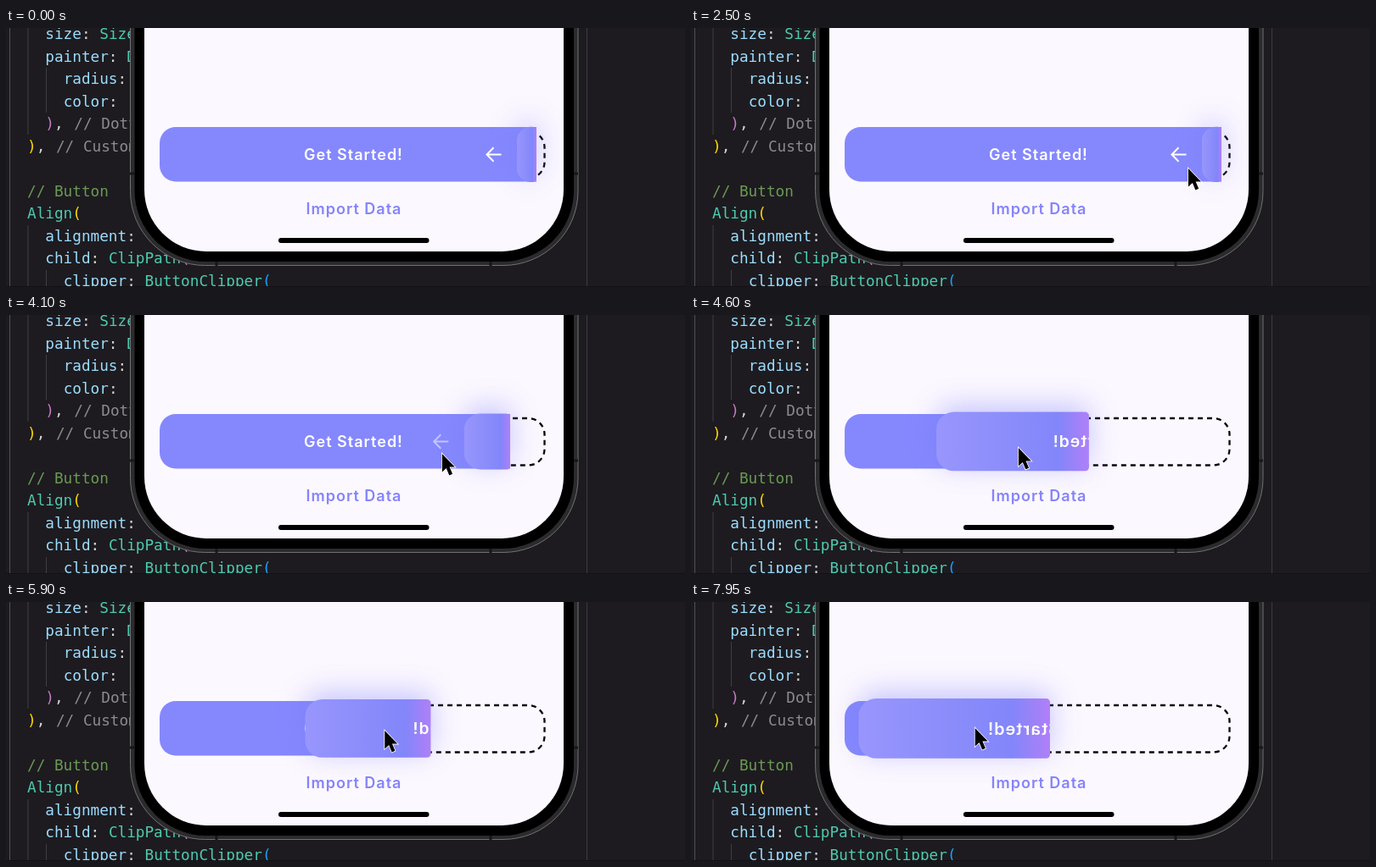
These frames come from a looping animation (800 by 306 pixels, 8 s). An HTML page:

```html
<!DOCTYPE html>
<html lang="en">
<head>
<meta charset="utf-8">
<title>Peel button</title>
<style>
  html, body { margin: 0; height: 100%; overflow: hidden; background: #1d1b1f; }
  svg { display: block; width: 800px; height: 306px; }
  .code { font: 17.7px "DejaVu Sans Mono", monospace; white-space: pre; }
  .label { font: 600 18px Inter, sans-serif; letter-spacing: 1px; }
</style>
</head>
<body>
<svg viewBox="0 0 800 306">
  <defs>
    <linearGradient id="sheen">
      <stop offset="0" stop-color="#9896fd"/>
      <stop offset=".45" stop-color="#8c8dfb"/>
      <stop offset=".8" stop-color="#8286fa"/>
      <stop offset="1" stop-color="#b07ff8"/>
    </linearGradient>
    <filter id="blur" x="-200" y="-100" width="1200" height="500" filterUnits="userSpaceOnUse">
      <feGaussianBlur stdDeviation="17"/>
    </filter>
    <clipPath id="screenClip"><path d="M163-10H657V190Q657 264 583 264H237Q163 264 163 190Z"/></clipPath>
    <clipPath id="keepClip"><rect id="keep" y="0" height="306"/></clipPath>
    <clipPath id="goneClip"><rect id="gone" y="0" width="800" height="306"/></clipPath>
    <clipPath id="flapClip"><path id="flapShape"/></clipPath>
  </defs>

  <rect width="800" height="306" fill="#1d1b1f"/>
  <path d="M4.5 0V306" stroke="#505052"/>
  <path d="M684.5 0V306" stroke="#3d3b3f"/>
  <path d="M26 0V126M47.5 47V100M26 233V306M47.5 286V306" stroke="#403e42"/>
  <g id="code" class="code"></g>
  <path d="M0 305.5H800" stroke="#121114"/>

  <!-- phone body -->
  <rect x="146.5" y="-200" width="527.5" height="480.5" rx="88" fill="#2b2b2d" stroke="#707073"/>
  <rect x="151.5" y="-200" width="517.5" height="476" rx="84" fill="#000"/>
  <path d="M146 172h5M669 172h5M248 276v5M571 276v5" stroke="#171719" stroke-width="3"/>
  <rect x="163" y="-200" width="494" height="464" rx="73" fill="#fcf8ff"/>

  <g clip-path="url(#screenClip)">
    <g clip-path="url(#goneClip)">
      <rect x="182" y="122" width="452.5" height="55.5" rx="19" fill="none" stroke="#08080a" stroke-width="2.3" stroke-dasharray="6 5"/>
    </g>
    <g clip-path="url(#keepClip)">
      <rect x="181" y="117" width="480" height="64.5" rx="19" fill="#8588fd"/>
      <text class="label" x="409.5" y="156" text-anchor="middle" fill="#fff">Get Started!</text>
    </g>
    <path id="shadow" fill="#7479fa" opacity=".42" filter="url(#blur)"/>
    <path id="arrow" d="M9 0H-8M0-8.3L-8 0L0 8.3" fill="none" stroke="#fff" stroke-width="2"/>
    <path id="flap" fill="url(#sheen)"/>
    <g clip-path="url(#flapClip)">
      <text id="backText" class="label" x="2" y="6.5" text-anchor="end" fill="#fff">Get Started!</text>
    </g>
    <text class="label" x="410" y="219.5" text-anchor="middle" fill="#8584fa">Import Data</text>
    <rect x="321" y="248" width="177.5" height="6" rx="3"/>
  </g>

  <path id="cursor" d="M0 0V21.5L4.9 17L8.4 25.4L12.2 23.8L8.7 15.6H15Z" stroke="#fff" stroke-width="1.6" paint-order="stroke"/>
</svg>
<script>
const el = id => document.getElementById(id);
const set = (id, attrs) => {
  for (const name in attrs) el(id).setAttribute(name, attrs[name]);
};

// Code listing: indent in characters, then colour/text pairs.
const PROP = '#9cdcfe', TYPE = '#4ec9b0', PLAIN = '#d4d4d4', NOTE = '#8c8a8e',
      GREEN = '#6a9955', GOLD = '#ffd700', PINK = '#c678c8', BLUE = '#179fff';
const CHAR = 10.66, LINE = 26.5;
const lines = [
  [2, PROP, 'size', PLAIN, ': ', TYPE, 'Size'],
  [2, PROP, 'painter', PLAIN, ': ', TYPE, 'DottedPainter'],
  [4, PROP, 'radius', PLAIN, ': '],
  [4, PROP, 'color', PLAIN, ': '],
  [2, PINK, ')', PLAIN, ', ', NOTE, '// DottedPainter'],
  [0, GOLD, ')', PLAIN, ', ', NOTE, '// CustomPaint'],
  [0],
  [0, GREEN, '// Button'],
  [0, TYPE, 'Align', GOLD, '('],
  [2, PROP, 'alignment', PLAIN, ': '],
  [2, PROP, 'child', PLAIN, ': ', TYPE, 'ClipPath', PINK, '('],
  [4, PROP, 'clipper', PLAIN, ': ', TYPE, 'ButtonClipper', BLUE, '(']
];
el('code').innerHTML = lines.map(([indent, ...parts], row) => {
  let spans = '';
  for (let i = 0; i < parts.length; i += 2) {
    const gap = parts[i] === NOTE ? 2 : 0;
    spans += `<tspan dx="${gap}" fill="${parts[i]}">${parts[i + 1]}</tspan>`;
  }
  return `<text x="${25 + indent * CHAR}" y="${13 + row * LINE}">${spans}</text>`;
}).join('');

// Keys are [time, value, ...]; tangents flatten at turning points.
function sample(keys, time, column = 1) {
  const last = keys.length - 1;
  if (time <= keys[0][0]) return keys[0][column];
  if (time >= keys[last][0]) return keys[last][column];
  const slope = i => (keys[i + 1][column] - keys[i][column]) / (keys[i + 1][0] - keys[i][0]);
  const tangent = i => {
    if (i === 0) return slope(0);
    if (i === last) return slope(last - 1);
    const a = slope(i - 1), b = slope(i);
    return a * b <= 0 ? 0 : 2 * a * b / (a + b);
  };
  const i = keys.findIndex(key => key[0] > time) - 1;
  const span = keys[i + 1][0] - keys[i][0], u = (time - keys[i][0]) / span, v = 1 - u;
  return keys[i][column] * v * v * (1 + 2 * u) + keys[i + 1][column] * u * u * (3 - 2 * u)
    + span * (tangent(i) * u * v * v - tangent(i + 1) * u * u * v);
}

const REST = 625;
const foldKeys = [[3750, REST], [4100, 594], [5000, 382], [5250, 368], [5900, 500],
                  [6350, REST], [7250, REST], [7950, 423], [8000, 410]];
const cursorKeys = [[1400, 672, 310], [2100, 602, 174], [2500, 586, 166], [3300, 572, 167],
                    [3750, 554, 166], [4100, 514, 164], [5000, 305, 152], [5250, 294, 151],
                    [5900, 446, 152], [6350, 560, 159], [7100, 554, 161], [7250, 550, 160],
                    [7950, 335, 149], [8000, 322, 149]];

function flapPath(left, right, scale) {
  const half = 32.4 * scale, top = 149.4 - half, bottom = 149.4 + half;
  const r = Math.min(19 * scale, (right - left) * .7), c = 4.5;
  return `M${left + r} ${top}H${right - c}Q${right} ${top} ${right} ${top + c}`
    + `V${bottom - c}Q${right} ${bottom} ${right - c} ${bottom}H${left + r}`
    + `A${r} ${r} 0 0 1 ${left} ${bottom - r}V${top + r}A${r} ${r} 0 0 1 ${left + r} ${top}Z`;
}

function draw(time) {
  const fold = sample(foldKeys, time);
  const left = 2 * fold - 648;
  const scale = 1 + (636 - fold) * .00044;
  const d = flapPath(left, fold, scale);
  set('keep', { x: 0, width: fold });
  set('gone', { x: fold });
  set('flap', { d });
  set('flapShape', { d });
  set('shadow', { d, transform: 'translate(0 -7)' });
  set('arrow', {
    transform: `translate(${left - 27.5} 149.5)`,
    opacity: Math.max(0, 1 - (REST - fold) / 62)
  });
  set('backText', {
    transform: `translate(${480 + (fold - 500) * 1.67} 149.5) scale(${-scale} ${scale})`
  });
  set('cursor', {
    transform: `translate(${sample(cursorKeys, time)} ${sample(cursorKeys, time, 2)})`,
    visibility: time < 1400 ? 'hidden' : 'visible'
  });
}

const start = performance.now();
function tick() {
  draw((performance.now() - start) % 8000);
  requestAnimationFrame(tick);
}
tick();
</script>
</body>
</html>
```
